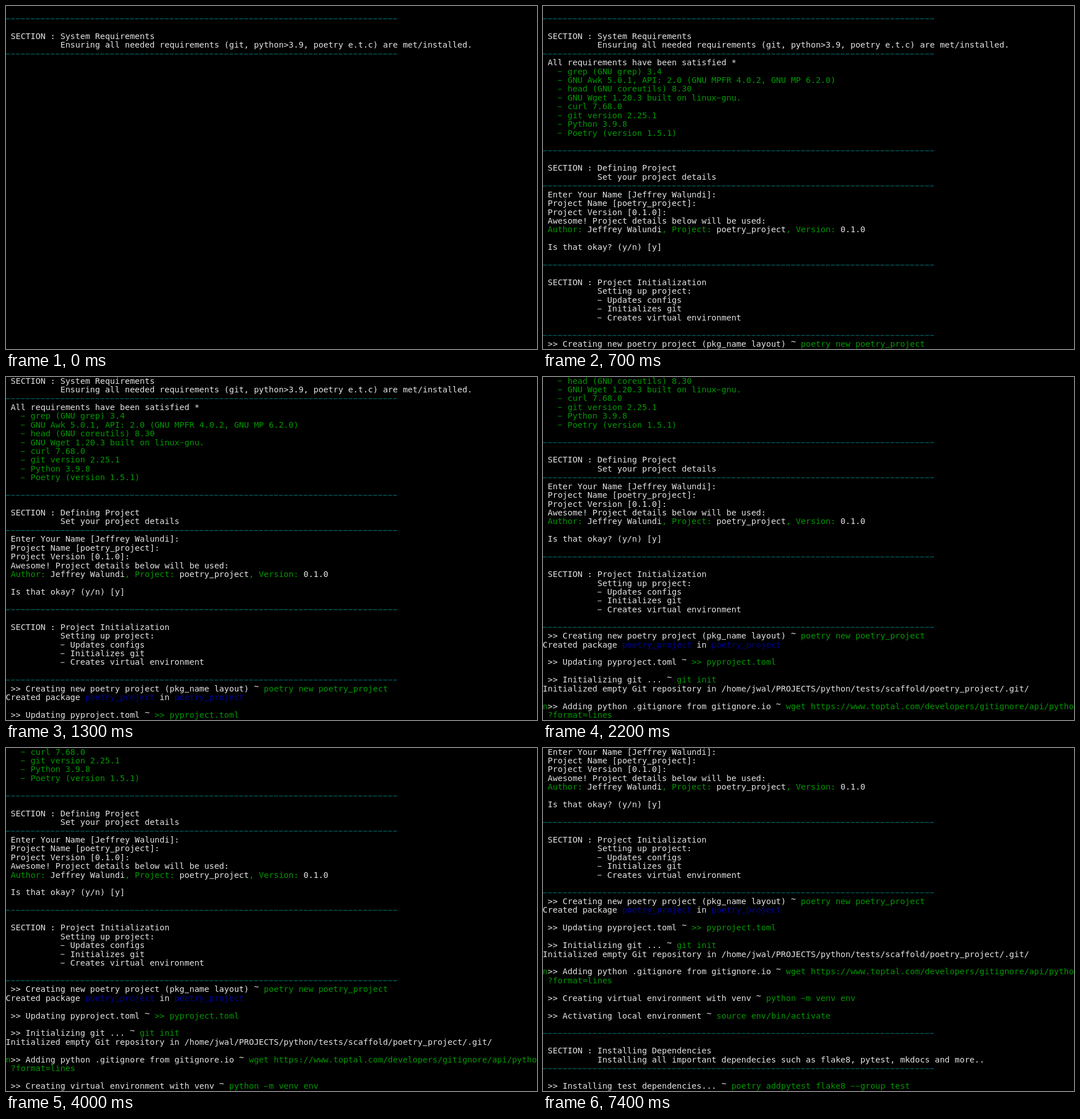
Animation, 930 px wide and 602 px high, one loop 8000 ms. Source, as an HTML page with a canvas:

```html
<!DOCTYPE html>
<html lang="en">
<head>
<meta charset="utf-8">
<title>Project setup</title>
<style>
html, body { margin: 0; width: 100%; height: 100%; overflow: hidden; background: #000; }
canvas { display: block; }
</style>
</head>
<body>
<canvas id="screen" width="930" height="602"></canvas>
<script>
const COLS = 107, ROWS = 39, LOOP = 8000;
const ctx = document.getElementById('screen').getContext('2d');
const cellW = 930 / COLS, cellH = 602 / ROWS;
const colors = { w: '#e4e4e4', g: '#009900', b: '#000099', t: '#008080' };
const rule = '|t' + '-'.repeat(79);

// "|x" switches the text colour to colors.x; every line starts white.
const lines = `
${rule}

 SECTION : System Requirements
           Ensuring all needed requirements (git, python>3.9, poetry e.t.c) are met/installed.
${rule}
 All requirements have been satisfied *
|g   - grep (GNU grep) 3.4
|g   - GNU Awk 5.0.1, API: 2.0 (GNU MPFR 4.0.2, GNU MP 6.2.0)
|g   - head (GNU coreutils) 8.30
|g   - GNU Wget 1.20.3 built on linux-gnu.
|g   - curl 7.68.0
|g   - git version 2.25.1
|g   - Python 3.9.8
|g   - Poetry (version 1.5.1)

${rule}

 SECTION : Defining Project
           Set your project details
${rule}
 Enter Your Name [Jeffrey Walundi]:
 Project Name [poetry_project]:
 Project Version [0.1.0]:
 Awesome! Project details below will be used:
|g Author: |wJeffrey Walundi|g, Project: |wpoetry_project|g, Version: |w0.1.0

 Is that okay? (y/n) [y]

${rule}

 SECTION : Project Initialization
           Setting up project:
           - Updates configs
           - Initializes git
           - Creates virtual environment

${rule}
 >> Creating new poetry project (pkg_name layout) ~ |gpoetry new poetry_project
Created package |bpoetry_project|w in |bpoetry_project

 >> Updating pyproject.toml ~ |g>> pyproject.toml

 >> Initializing git ... ~ |ggit init
Initialized empty Git repository in /home/jwal/PROJECTS/python/tests/scaffold/poetry_project/.git/

|gn|w>> Adding python .gitignore from gitignore.io ~ |gwget https://www.toptal.com/developers/gitignore/api/pytho
|g ?format=lines

 >> Creating virtual environment with venv ~ |gpython -m venv env

 >> Activating local environment ~ |gsource env/bin/activate

${rule}

 SECTION : Installing Dependencies
           Installing all important dependecies such as flake8, pytest, mkdocs and more..
${rule}

 >> Installing test dependencies... ~ |gpoetry addpytest flake8 --group test`.split('\n');

// [start time in ms, number of lines printed so far]
const steps = [
  [0, 6], [600, 22], [700, 39], [1200, 41], [1300, 42], [2200, 48],
  [3900, 49], [4000, 50], [7300, 51], [7400, 60]
];

function drawChar(ch, x, y) {
  if (ch === '-') ctx.fillRect(x, y + 6.6, 6.8, 1);
  else if (ch === '_') ctx.fillRect(x, y + 12.5, 7.7, 1);
  else if (ch !== ' ') ctx.fillText(ch, x - 0.4, y + (ch === '~' ? 7.5 : 11.5));
}

function drawLine(line, y) {
  let col = 0;
  ('w' + line).split('|').filter((run, i) => i || run.length > 1).forEach(run => {
    ctx.fillStyle = colors[run[0]];
    for (const ch of run.slice(1)) drawChar(ch, cellW * col++, y);
  });
}

function draw(count) {
  ctx.fillStyle = '#000';
  ctx.fillRect(0, 0, 930, 602);
  ctx.font = '14.44px "DejaVu Sans Mono", monospace';
  const top = Math.max(0, count - ROWS);
  lines.slice(top, count).forEach((line, row) => drawLine(line, row * cellH));
}

let shown = -1;
function tick(now) {
  const time = now % LOOP;
  const count = steps.filter(([start]) => start <= time).pop()[1];
  if (count !== shown) draw(shown = count);
  requestAnimationFrame(tick);
}
tick(performance.now());
</script>
</body>
</html>
```
